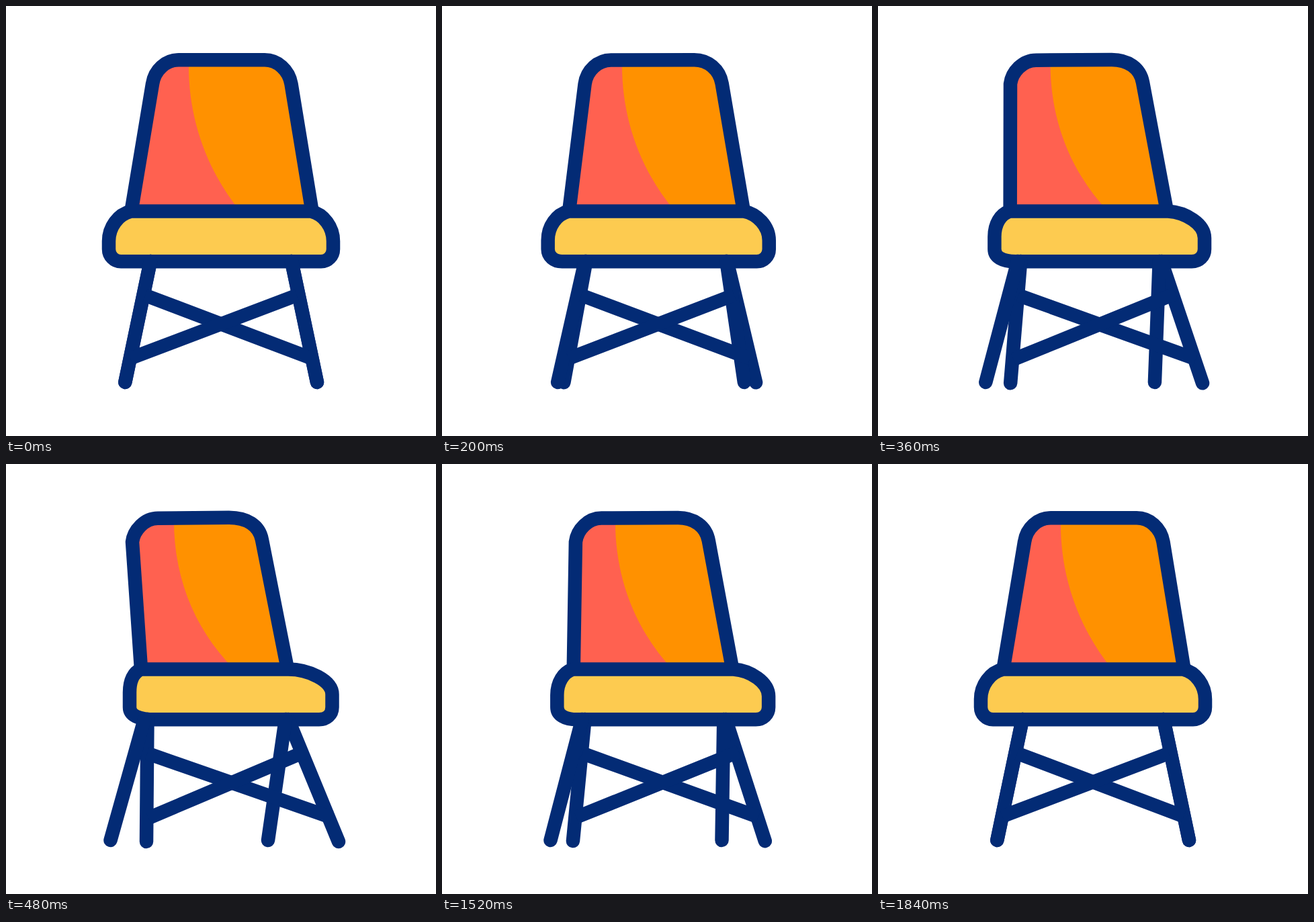
Recreate the animation shown at these times as an HTML page. Size 640x640 px, loop 2000 ms.

```html
<!DOCTYPE html>
<html lang="en">
<head>
<meta charset="utf-8">
<title>Turning chair</title>
<style>
  html, body { margin: 0; width: 100%; height: 100%; overflow: hidden; background: #fff; }
  svg { display: block; width: 100%; height: 100%; }
  .line { fill: none; stroke: #032b75; stroke-width: 20.5; stroke-linejoin: round; }
  .leg { stroke-linecap: round; }
</style>
</head>
<body>
<svg id="stage" viewBox="0 0 640 640"></svg>
<script>
const LOOP = 2000, STEP = 40;
const stage = document.getElementById('stage');

// Each part: front view, turned view, bend of its progress, looks drawn with that path.
const backFront = 'M186.5 305 L218 116 C221 95 238 80.3 257 80.3 L385 80.3 C404 80.3 421 95 424.5 116 L455.5 305';
const backTurned = 'M201 305 L188 116 C190 99 206 80.8 226 80.8 L332 79.8 C358 79.8 377 91 381 113 L419 305';
const parts = [
  [backFront, backTurned, 0, { fill: '#ff6150' }],
  ['M272 80 C270 165 298 243 348 305 L455.5 305 L424.5 116 C421 95 404 80.3 385 80.3 Z',
   'M250 80 C249 160 275 240 339 305 L419 305 L381 113 C377 91 358 79.8 332 79.8 Z',
   0, { fill: '#ff9100' }],
  [backFront, backTurned, 0, { class: 'line' }],
  ['M186 305.5 C167 310 153 329 153 350 L153 362 C153 372 161 380.3 171 380.3 L469 380.3 C479 380.3 487 372 487 362 L487 350 C487 329 473 310 454 305.5 Z',
   'M201 305.5 C190 310 184 322 184 340 L184 362 C184 374 197 380.3 222 380.3 L466 380.3 C477 380.3 485.5 373 485.5 362 L485.5 343 C485.5 322 450 305.5 420 305.5 Z',
   -.2, { class: 'line', style: 'fill:#fdcb50' }],
  // Front legs, back legs, cross bars
  ['M215 380 L177.3 560', 'M210.5 380 L209 562', -.35, { class: 'line leg' }],
  ['M425 380 L463 560', 'M420 380 L495 562', -.35, { class: 'line leg' }],
  ['M215 380 L177.3 560', 'M206 380 L155.5 560', .38, { class: 'line leg' }],
  ['M425 380 L463 560', 'M416 380 L390 560', 0, { class: 'line leg' }],
  ['M207 430.5 L455 524.5', 'M210 430.5 L484 526', -.4, { class: 'line' }],
  ['M433 430.5 L185 524.5', 'M449 426.5 L212 527', -.4, { class: 'line' }]
].map(([front, turned, bend, look]) => {
  const node = document.createElementNS('http://www.w3.org/2000/svg', 'path');
  for (const key in look) node.setAttribute(key, look[key]);
  stage.append(node);
  return { node, front, ends: turned.match(/[\d.]+/g), bend };
});

const clamp = x => Math.min(1, Math.max(0, x));
const ease = (u, quick) => (1 - quick) * u * u * (3 - 2 * u) + quick * u * u;

function turnAt(t) {
  return t < 1000 ? ease(clamp((t - 80) / 400), .286)
                  : ease(clamp((1840 - t) / 480), .35);
}

function morph(front, ends, p) {
  let i = 0;
  return front.replace(/[\d.]+/g, n => +n + (ends[i++] - n) * p);
}

const start = performance.now();
function draw() {
  const t = Math.floor(((performance.now() - start) % LOOP) / STEP) * STEP;
  const p = turnAt(t);
  for (const { node, front, ends, bend } of parts)
    node.setAttribute('d', morph(front, ends, p + bend * p * (1 - p)));
  requestAnimationFrame(draw);
}
draw();
</script>
</body>
</html>
```
